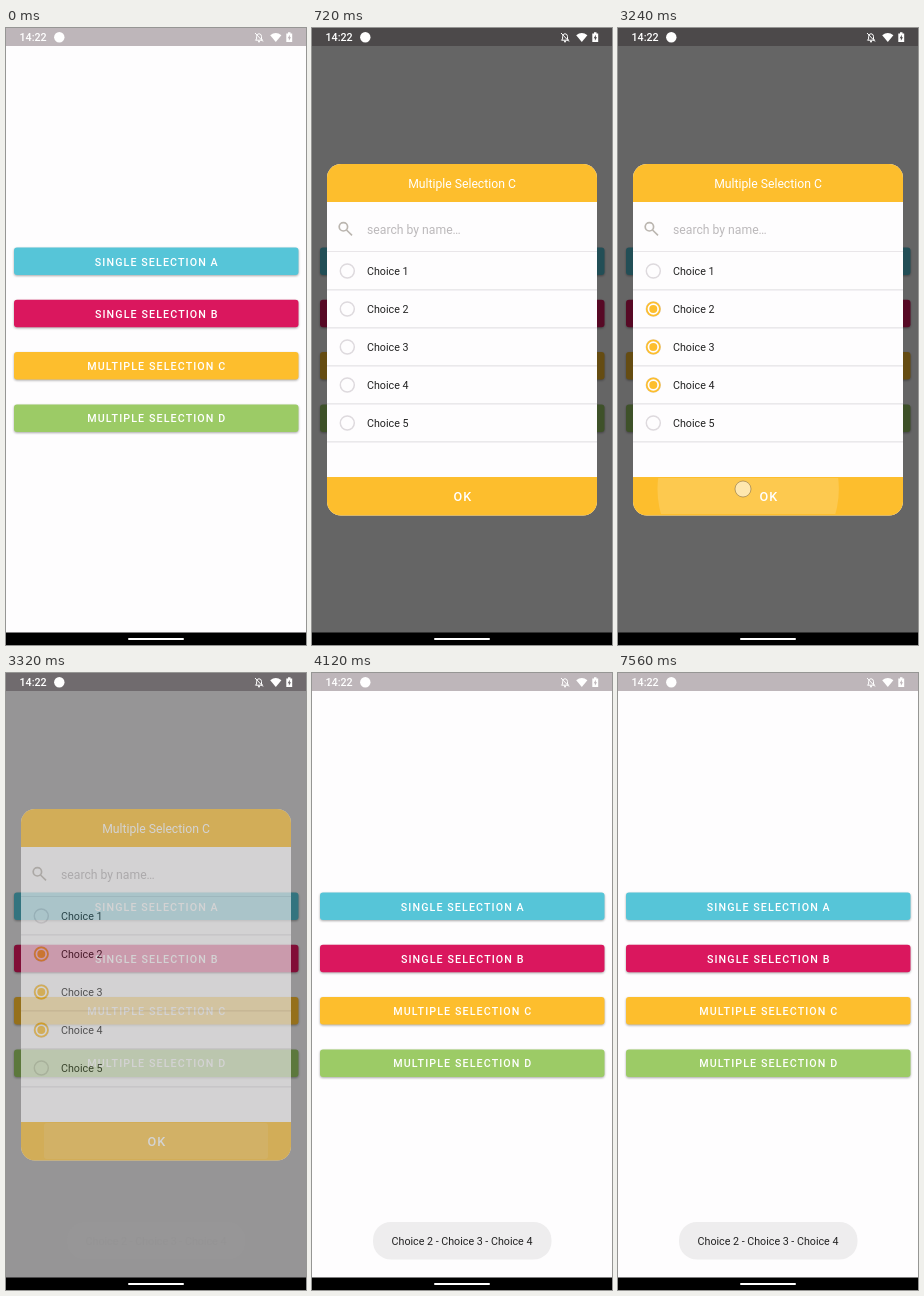
Write an HTML page that moves like this. It is 300 px wide and 617 px high and loops after 7.64 s.

```html
<!DOCTYPE html>
<html lang="en">
<head>
<meta charset="utf-8">
<style>
  html, body { margin: 0; width: 100%; height: 100%; overflow: hidden; background: #fefdfe; }
  svg { display: block; width: 100vw; height: 100vh; font: 10.7px Roboto, sans-serif; }
  .caps { font-weight: 500; letter-spacing: 1.1px; fill: #fff; }
  .mid { text-anchor: middle; }
  .button { filter: drop-shadow(0 1px 1px #0005); }
</style>
</head>
<body>
<svg viewBox="0 0 300 617">
  <defs>
    <clipPath id="card"><rect x="15" y="136" width="270" height="351.5" rx="14"/></clipPath>
    <clipPath id="buttonClip"><rect x="8" y="324" width="284.5" height="27.5" rx="3"/></clipPath>
    <clipPath id="okClip"><rect x="38" y="450" width="224" height="36" rx="3"/></clipPath>
  </defs>
  <rect width="300" height="617" fill="#fefdfe"/>
  <rect width="300" height="18" fill="#beb6ba"/>
  <g id="buttons"></g>
  <g clip-path="url(#buttonClip)"><circle id="buttonRipple" fill="#fff"/></g>
  <rect id="scrim" width="300" height="617"/>

  <g id="dialog"><g clip-path="url(#card)">
    <rect x="15" y="136" width="270" height="352" fill="#fefdfe"/>
    <rect x="15" y="136" width="270" height="38" fill="#fdbe2d"/>
    <text class="mid" x="150" y="159.5" font-size="12.2" fill="#fff">Multiple Selection C</text>
    <g fill="none" stroke="#bbb6b0" stroke-width="1.7">
      <circle cx="31.4" cy="198.8" r="4.2"/><path d="M34.5 202L40 207.300"/>
    </g>
    <text x="55" y="206" font-size="12.2" fill="#bcb9bb">search by name…</text>
    <path d="M15 223.500H285" stroke="#e9e6e9"/>
    <g id="rows"></g>
    <rect x="15" y="449" width="270" height="39" fill="#fdbe2d"/>
    <g clip-path="url(#okClip)"><circle id="okRipple" fill="#fff"/></g>
    <text class="caps mid" x="151" y="473" font-size="12.6">OK</text>
  </g></g>

  <g fill="#fff">
    <text x="13.500" y="13.300" font-size="10.7" font-weight="500">14:22</text>
    <circle cx="53.300" cy="9.300" r="5.200"/>
    <path d="M264.200 7.200Q269.800 2.600 275.400 7.200L269.800 14Z"/>
    <path fill-rule="evenodd" d="M280.300 5.500H282V4.300H284.500V5.500H286.200V14H280.300ZM283.800 6.700L281.700 10.200H282.900V12.800L285 9.200H283.800Z"/>
    <path d="M249.500 12.200H256.600L255.500 11V8.500Q255.500 6 253 5.700Q250.600 6 250.600 8.500V11ZM249 5L257 13.500" fill="none" stroke="#fff"/>
    <circle cx="253" cy="13.400" r="1"/>
  </g>
  <rect y="604.500" width="300" height="13"/>
  <rect x="122" y="610" width="56" height="2" rx="1" fill="#fff"/>

  <g id="toast">
    <rect x="61" y="549" width="178.500" height="37.500" rx="18" fill="#eeedee"/>
    <text class="mid" x="150" y="572" fill="#222">Choice 2 - Choice 3 - Choice 4</text>
  </g>
  <circle id="touch" r="8" fill="#fff" fill-opacity=".55" stroke="#806a40" stroke-opacity=".55"/>
</svg>
<script>
const LOOP = 7640;
const $ = id => document.getElementById(id);
const set = (el, attrs) => { for (const k in attrs) el.setAttribute(k, attrs[k]); };
const ramp = (t, start, end) => Math.min(1, Math.max(0, (t - start) / (end - start)));

const buttons = [
  ['SINGLE SELECTION A', '#56c5d8'],
  ['SINGLE SELECTION B', '#da175e'],
  ['MULTIPLE SELECTION C', '#fdbe2d'],
  ['MULTIPLE SELECTION D', '#9ccb66'],
];
$('buttons').innerHTML = buttons.map(([label, color], i) => {
  const y = 219.5 + i * 52.3;
  return `<rect class="button" x="8" y="${y}" width="284.5" height="27.5" rx="3" fill="${color}"/>
    <text class="caps mid" x="150.8" y="${y + 18}">${label}</text>`;
}).join('');

$('rows').innerHTML = [1, 2, 3, 4, 5].map(n => `
  <g transform="translate(0 ${205 + n * 38})">
    <circle cx="35.3" r="7" fill="none" stroke="#dedade" stroke-width="1.5"/>
    <g class="checked">
      <circle cx="35.3" r="7.4" fill="#fdbe2d"/>
      <circle class="hole" cx="35.3" fill="#fefdfe"/>
      <circle class="dot" cx="35.3" r="4" fill="#fdbe2d"/>
    </g>
    <text x="55" y="4.400" fill="#222">Choice ${n}</text>
    <path d="M15 18.900H285" stroke="#dfdce0"/>
  </g>`).join('');
const rows = [...$('rows').children];

// Each tap: press time, release time, position.
const taps = [
  [40, 200, 150, 339],
  [1480, 1600, 125, 282],
  [2040, 2160, 125, 320],
  [2600, 2720, 125, 358],
  [3140, 3280, 125, 461],
];
const checkTimes = { 2: 1600, 3: 2160, 4: 2720 };

function drawRow(row, p) {
  set(row.querySelector('.checked'), { opacity: Math.min(1, p * 1.7) });
  set(row.querySelector('.hole'), { r: 5.7 * Math.abs(1 - 2 * p) });
  set(row.querySelector('.dot'), { opacity: p > 0.5 ? 1 : 0 });
  set(row.querySelector('text'), { opacity: 1 - 1.3 * p * (1 - p) });
}

function drawRipple(el, t, [press, release, x, y]) {
  const grow = ramp(t, press, press + 220);
  set(el, {
    cx: x + (150 - x) * grow * 0.45, cy: y, r: 20 + 154 * grow,
    opacity: t < press ? 0 : 0.16 * (1 - ramp(t, release, release + 150)),
  });
}

function draw(t) {
  const closing = t >= 3280;
  set($('scrim'), { opacity: 0.6 * (closing ? 1 - ramp(t, 3280, 3412) : ramp(t, 240, 500)) });
  set($('dialog'), {
    opacity: closing ? 1 - ramp(t, 3280, 3380) : 1 - (1 - ramp(t, 240, 460)) ** 1.4,
  });
  set($('toast'), { opacity: ramp(t, 3320, 3480) });
  rows.forEach((row, i) => {
    const start = checkTimes[i + 1];
    drawRow(row, start ? ramp(t, start, start + 240) : 0);
  });
  drawRipple($('buttonRipple'), t, taps[0]);
  drawRipple($('okRipple'), t, taps[4]);
  const tap = taps.find(([press, release]) => t >= press && t < release);
  set($('touch'), { opacity: tap ? 1 : 0, cx: tap ? tap[2] : 0, cy: tap ? tap[3] : 0 });
}

const origin = performance.now();
function tick() {
  draw((performance.now() - origin) % LOOP);
  requestAnimationFrame(tick);
}
tick();
</script>
</body>
</html>
```
